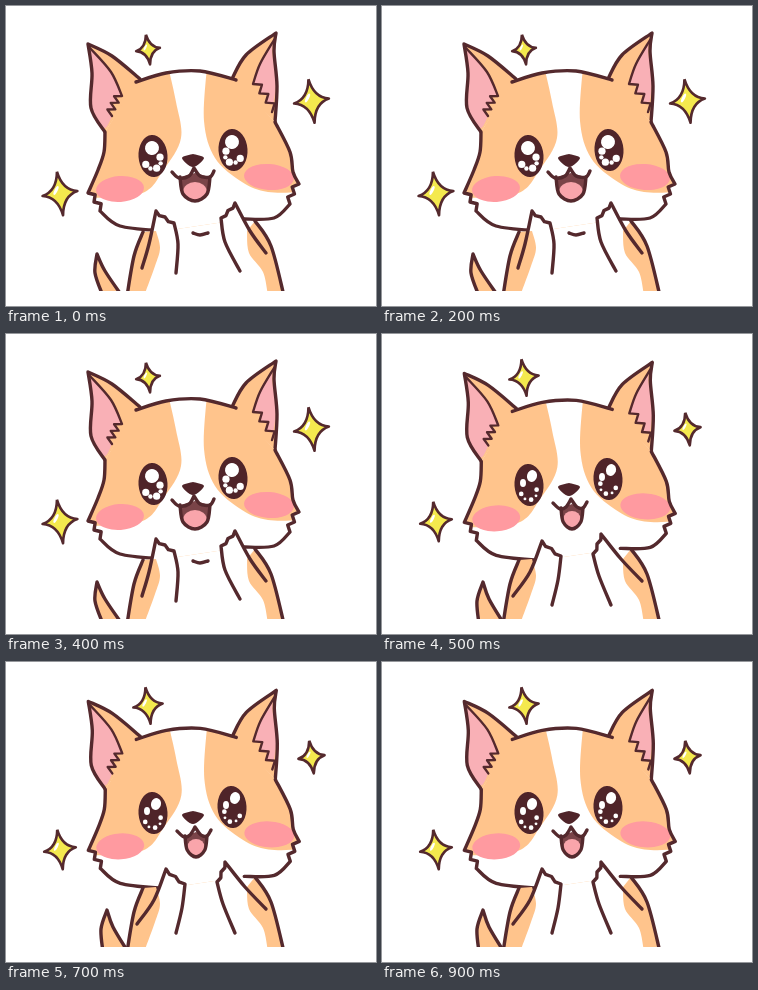
Write an HTML page that moves like this. It is 370 by 300 pixels and loops after 1 s.

```html
<!DOCTYPE html>
<html lang="en">
<head>
<meta charset="utf-8">
<title>Happy puppy</title>
<style>
html, body { margin: 0; width: 100%; height: 100%; overflow: hidden; background: #fff }
svg { display: block; width: 370px; height: 300px }
.ink { fill: none; stroke: #54292d; stroke-width: 3.4; stroke-linecap: round; stroke-linejoin: round }
.thin { stroke-width: 2.4 }
.orange { fill: #ffc48c }
.pink { fill: #f9b0b6 }
.white { fill: #fff }
.dark { fill: #4f2429 }
.mouth { fill: #7a4448 }
.tongue { fill: #f9a5ab }
.blush { fill: #ff9aa0 }
.star { fill: #f4e94e; stroke: #54292d; stroke-width: 2.6; stroke-linejoin: round }
</style>
</head>
<body>
<svg viewBox="0 0 370 300">
  <clipPath id="stage"><rect width="370" height="285"/></clipPath>
  <clipPath id="face"></clipPath>
  <g id="poses" clip-path="url(#stage)"></g>
</svg>
<script>
// Smooth curve through the points x, y, x, y, ...
function curve(...v) {
  const last = v.length / 2 - 1;
  const at = (i, c) => v[2 * Math.min(Math.max(i, 0), last) + c];
  const handle = (i, c, s) => at(i, c) + s * (at(i + 1, c) - at(i - 1, c)) / 6;
  let d = `L${v[0]} ${v[1]}`;
  for (let i = 0; i < last; i++)
    d += `C${[handle(i, 0, 1), handle(i, 1, 1), handle(i + 1, 0, -1), handle(i + 1, 1, -1), at(i + 1, 0), at(i + 1, 1)]}`;
  return d;
}

// Zigzag of n notches for fur and knuckles
function zig(x0, y0, x1, y1, n, depth) {
  const dx = x1 - x0, dy = y1 - y0, len = Math.hypot(dx, dy);
  let d = '';
  for (let i = 0; i <= 2 * n; i++) {
    const t = i / (2 * n), o = i % 2 * depth / len;
    d += `L${x0 + dx * t - dy * o} ${y0 + dy * t + dx * o}`;
  }
  return d;
}

const path = (c, ...parts) => `<path class="${c}" d="M${parts.join('').slice(1)}"/>`;
const oval = (c, x, y, rx, ry = rx, a = 0) =>
  `<ellipse class="${c}" cx="${x}" cy="${y}" rx="${rx}" ry="${ry}" transform="rotate(${a} ${x} ${y})"/>`;

function ear(outer, inner, tuft, back) {
  return path('orange', outer) + path('pink', inner, tuft, back) +
    path('ink', outer) + path('ink thin', inner, tuft);
}

function head() {
  const top = curve(130, 76, 160, 67, 194, 65, 230, 74);
  const right = curve(269, 116, 284, 146, 287, 166, 293, 178) + zig(293, 178, 284, 198, 2, 5) +
    curve(284, 198, 268, 212, 238, 213);
  const left = curve(158, 225, 114, 220, 94, 205) + zig(94, 205, 82, 187, 2, 5) +
    curve(82, 187, 92, 164, 98, 146, 99, 126);
  document.getElementById('face').innerHTML = path('', top, right, left);
  return ear(curve(99, 126, 85, 102, 86, 67, 82, 38) + curve(82, 38, 106, 50, 134, 73),
      curve(84, 42, 105, 66, 116, 90), zig(116, 90, 106, 110, 3, 7), curve(106, 110, 98, 122, 86, 102, 87, 67, 84, 42)) +
    ear(curve(226, 73, 240, 49, 270, 27) + curve(270, 27, 268, 45, 271, 80, 269, 116),
      curve(268, 34, 254, 58, 247, 78), zig(247, 78, 266, 106, 3, -7), curve(266, 106, 270, 75, 266, 45, 268, 34)) +
    path('orange', top, right, left) +
    `<g clip-path="url(#face)">` +
    path('white', curve(162, 60, 170, 96, 175, 132, 158, 163, 134, 188, 70, 192), 'L70 240L300 240',
      curve(300, 186, 262, 186, 236, 176, 209, 152, 198, 115, 201, 60)) + '</g>' +
    oval('blush', 114, 183, 24, 13, -4) + oval('blush', 263, 171, 25, 13, 4) +
    path('ink', top) + path('ink', right) + path('ink', left);
}

// k is 0 with the mouth wide open, 1 with the paws drawn in; side mirrors the beads.
function eye(x, y, side, k) {
  let s = oval('dark', x, y, 14.5, 21, -4) + oval('white', x - 1 + 4 * k, y - 8 - k, 7 - 2 * k, 7 - k, 15);
  if (k) s += oval('white', x - 6, y - 2, 3, 4);
  for (let i = 0; i < 5; i++) {
    const a = -.5 + i * .8 + .2 * k;
    s += oval('white', x + side * 8 * Math.cos(a), y + 5 + 2 * k + 8 * Math.sin(a), (i % 2 ? 2.2 : 3.6) * (1 - .35 * k));
  }
  return s;
}

function muzzle(k) {
  const x = 189 + k, w = 15 - 4 * k, t = 171 + 3 * k, b = 195;
  const lips = curve(x - w - 8, t - 5, x - w - 1, t + 1, x - 6, t - 1, x - 1, t - 9) +
    curve(x - 1, t - 9, x + 5, t - 1, x + w, t, x + w + 4, t - 6);
  const jaw = curve(x - w, t, x - w * .8, b - 7, x, b, x + w * .8, b - 7, x + w, t);
  return path('dark', curve(187, 148 + k, 198, 152 + k, 187, 161 + k, 176, 152 + k, 187, 148 + k)) +
    path('mouth', jaw, `L${x} ${t - 4}`) + oval('tongue', x, b - 10, w * .78, 9 - k) +
    path('ink', jaw) + path('ink', lips);
}

function arms(k) {
  const sideL = curve(137, 226, 128, 250, 121, 290), sideR = curve(249, 215, 265, 240, 278, 290);
  const pawL = curve(136 - 5 * k, 262, 143 + 5 * k, 238, 150 + 10 * k, 205 + 2 * k) +
    zig(150 + 10 * k, 205 + 2 * k, 168 + 11 * k, 217 + 5 * k, 2, 2) +
    curve(168 + 11 * k, 217 + 5 * k, 172 + 4 * k, 238 + 8 * k, 170, 267 + 4 * k);
  const pawR = curve(260, 247, 244 - 5 * k, 225, 229 - 10 * k, 197 + 3 * k) +
    zig(229 - 10 * k, 197 + 3 * k, 215 - 4 * k, 212 + 8 * k, 2, -2) +
    curve(215 - 4 * k, 212 + 8 * k, 219 - 2 * k, 236 + 6 * k, 234 - 5 * k, 265 + 6 * k);
  return path('white', pawL) + path('white', pawR) +
    path('orange', sideL, curve(138, 290, 149, 260, 154, 242, 150, 225)) +
    path('orange', sideR, curve(262, 290, 257, 266, 243, 247, 241, 225)) +
    [sideL, sideR, pawL, pawR].map(d => path('ink', d)).join('') +
    (k ? '' : path('ink', curve(187, 227, 194, 229, 202, 227)));
}

function tail(k) {
  const d = curve(97, 290, 89 + 6 * k, 267, 91 + 10 * k, 248) + curve(91 + 10 * k, 248, 99 + 8 * k, 265, 116 + 6 * k, 290);
  return path('orange', d) + path('ink', d);
}

function star(x, y, h) {
  const w = .8 * h, p = .13 * h;
  return `<g transform="translate(${x} ${y}) rotate(-8)">
    <path class="star" d="M0 ${-h}Q${p} ${-p} ${w} 0Q${p} ${p} 0 ${h}Q${-p} ${p} ${-w} 0Q${-p} ${-p} 0 ${-h}"/>
    ${oval('white', -.16 * h, -.16 * h, .07 * h, .22 * h, 35)}</g>`;
}

const skull = head();
const pose = k => `<g>${tail(k)}<g transform="translate(${.3 * k} ${1.4 * k})">${skull}</g>
  ${eye(147, 150 + k, 1, k)}${eye(227 - k, 144 + k, -1, k)}${muzzle(k)}${arms(k)}
  ${star(142, 43.5, 15 + 3.5 * k)}${star(305.5, 95, 22 - 5.5 * k)}${star(54, 187.5, 22 - 2 * k)}</g>`;

const poses = document.getElementById('poses');
poses.innerHTML = pose(0) + pose(1);

const start = performance.now();
function tick() {
  const now = Math.floor((performance.now() - start) / 100) % 2;
  [...poses.children].forEach((g, i) => g.style.display = i === now ? '' : 'none');
  requestAnimationFrame(tick);
}
tick();
</script>
</body>
</html>
```
